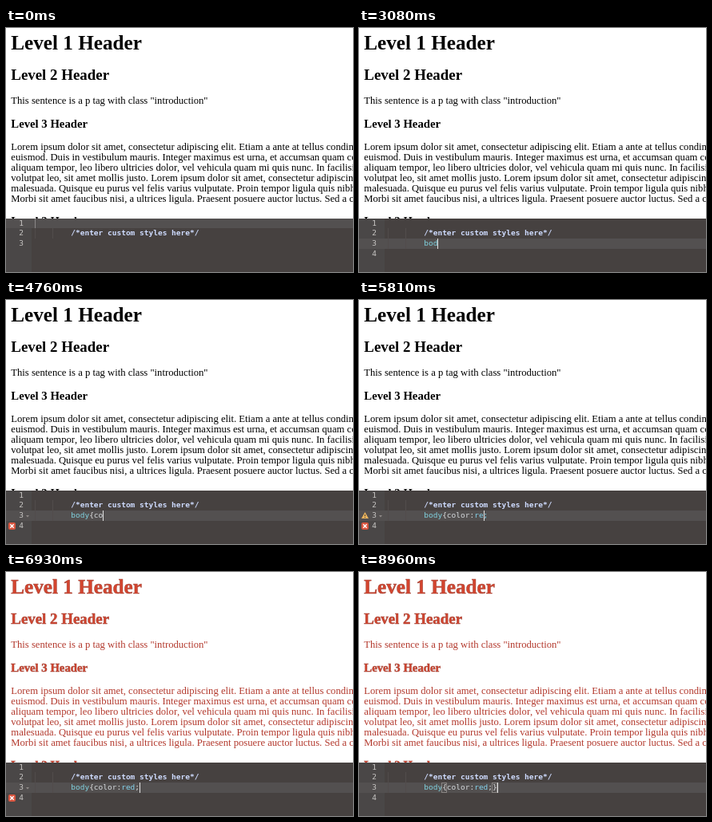
Animation, 434 px wide and 306 px high, one loop 9030 ms. Source, as an HTML page with a canvas:

```html
<!DOCTYPE html>
<html lang="en">
<head>
<meta charset="utf-8">
<title>Live style editor</title>
<style>
  html, body { margin: 0; width: 100%; height: 100%; overflow: hidden; background: #fff; }
  canvas { display: block; }
</style>
</head>
<body>
<canvas id="stage" width="434" height="306"></canvas>
<script>
const ctx = document.getElementById('stage').getContext('2d');
const LOOP = 9030;
const SERIF = '"Liberation Serif", serif';
const MONO = '"DejaVu Sans Mono", monospace';
const EDITOR_TOP = 239, ROW = 12.7, CHAR = 5.72, CODE_X = 35.5, INDENT = 8;
ctx.fontKerning = 'none';

// [start, text before caret, text after caret]
const typing = [
  [2240, '', ''], [2730, 'b', ''], [2870, 'bo', ''], [3080, 'bod', ''], [3150, 'body', ''],
  [4130, 'body{', ''], [4340, 'body{c', ''], [4480, 'body{co', ''],
  [4830, 'body{col', ''], [4900, 'body{colo', ''], [5040, 'body{color', ''],
  [5250, 'body{color:', ';'], [5600, 'body{color:r', ';'], [5740, 'body{color:re', ';'],
  [5950, 'body{color:red', ';'], [6790, 'body{color:red;', ''], [7350, 'body{color:red;}', '']
];

const paragraph = [
  'Lorem ipsum dolor sit amet, consectetur adipiscing elit. Etiam a ante at tellus condimentum',
  'euismod. Duis in vestibulum mauris. Integer maximus est urna, et accumsan quam consequat',
  'aliquam tempor, leo libero ultricies dolor, vel vehicula quam mi quis nunc. In facilisis',
  'volutpat leo, sit amet mollis justo. Lorem ipsum dolor sit amet, consectetur adipiscing',
  'malesuada. Quisque eu purus vel felis varius vulputate. Proin tempor ligula quis nibh',
  'Morbi sit amet faucibus nisi, a ultrices ligula. Praesent posuere auctor luctus. Sed a congue'
];

function text(str, x, y, font, color) {
  ctx.font = font;
  ctx.fillStyle = color;
  ctx.fillText(str, x, y);
}

function box(x, y, w, h, color) {
  ctx.fillStyle = color;
  ctx.fillRect(x, y, w, h);
}

const rowTop = row => Math.floor(EDITOR_TOP + ROW * (row - 1));
const rowHeight = row => rowTop(row + 1) - rowTop(row);
const columnX = col => CODE_X + CHAR * col;

function code(str, row, col, color, weight = 'normal') {
  text(str, columnX(col), rowTop(row) + 9, `${weight} 9.5px ${MONO}`, color);
}

function drawPage(red) {
  const heading = (str, y, size) => {
    text(str, 6.3, y, `bold ${size}px ${SERIF}`, red ? '#d4452f' : '#000');
    if (!red) return;
    ctx.strokeStyle = '#9c4034';
    ctx.lineWidth = 0.5;
    ctx.strokeText(str, 6.3, y);
  };
  const line = (str, y) => text(str, 6.3, y, `12.65px ${SERIF}`, red ? '#b3392d' : '#000');
  box(0, 0, 434, 306, '#fff');
  heading('Level 1 Header', 27, 25.2);
  heading('Level 2 Header', 65, 18.9);
  line('This sentence is a p tag with class "introduction"', 95);
  heading('Level 3 Header', 125, 14.74);
  paragraph.forEach((str, i) => line(str, 153 + 13 * i));
  heading('Level 3 Header', 247, 14.74);
}

function drawError(y) {
  ctx.fillStyle = '#d9553f';
  ctx.beginPath();
  ctx.roundRect(3, y, 9, 9, 2);
  ctx.fill();
  ctx.strokeStyle = '#fff';
  ctx.lineWidth = 1.5;
  ctx.beginPath();
  ctx.moveTo(5.3, y + 2.3); ctx.lineTo(9.7, y + 6.7);
  ctx.moveTo(9.7, y + 2.3); ctx.lineTo(5.3, y + 6.7);
  ctx.stroke();
}

function drawWarning(y) {
  ctx.fillStyle = '#e9b25c';
  ctx.beginPath();
  ctx.moveTo(7.5, y);
  ctx.lineTo(12, y + 8);
  ctx.lineTo(3, y + 8);
  ctx.fill();
  box(7, y + 3, 1, 2, '#443c30');
  box(7, y + 6, 1, 1, '#443c30');
}

function drawRule(str) {
  const parts = [
    ['body', '#80d2df'], ['{', '#dedede'], ['color', '#d6dadd'],
    [':', '#dedede'], ['red', '#85d5ee'], [';', '#dedede'], ['}', '#dedede']
  ];
  let pos = 0;
  for (const [part, color] of parts) {
    code(str.slice(pos, pos + part.length), 3, INDENT + pos, color);
    pos += part.length;
  }
}

function drawEditor(t) {
  const step = typing.filter(s => s[0] <= t).pop();
  const [, before, after] = step || [0, '', ''];
  const rule = before + after;
  const row = t < 1750 ? 1 : step ? 3 : 2;
  const caretCol = row === 1 ? 0 : INDENT + (row === 2 ? 28 : before.length);
  const closed = rule.endsWith('}');

  box(0, EDITOR_TOP, 434, 67, '#464140');
  box(0, EDITOR_TOP, 32, 67, '#4a4747');
  box(0, rowTop(row), 434, rowHeight(row), '#535050');

  for (const r of step ? [2, 3] : [2])
    for (const col of [0, 4]) box(Math.round(columnX(col)), rowTop(r), 1, rowHeight(r), '#514c4b');

  ctx.textAlign = 'right';
  for (let n = 1; n <= (step ? 4 : 3); n++)
    text(n, 22, rowTop(n) + 9, `9.5px ${MONO}`, '#c6c4c2');
  ctx.textAlign = 'left';

  code('/*enter custom styles here*/', 2, INDENT, '#cfdcff', 'bold');
  drawRule(rule);

  if (rule.includes('{') && !closed) {
    ctx.fillStyle = '#908b89';
    ctx.beginPath();
    ctx.moveTo(25, 270); ctx.lineTo(29, 270); ctx.lineTo(27, 272.5);
    ctx.fill();
  }
  if (closed) {
    ctx.strokeStyle = '#898583';
    ctx.lineWidth = 1;
    for (const pos of [4, 15])
      ctx.strokeRect(Math.round(columnX(INDENT + pos)) - 0.5, rowTop(3) + 0.5, 6, 12);
  }
  if (t >= 3220 && t < 7910) drawError(279);
  if (t >= 5740 && t < 6440) drawWarning(266);

  box(Math.round(columnX(caretCol)), rowTop(row), 1, rowHeight(row), row === 1 ? '#8b8887' : '#e2e2e2');
}

function frame(now) {
  const t = now % LOOP;
  drawPage(t >= 5950);
  drawEditor(t);
  requestAnimationFrame(frame);
}
requestAnimationFrame(frame);
</script>
</body>
</html>
```
